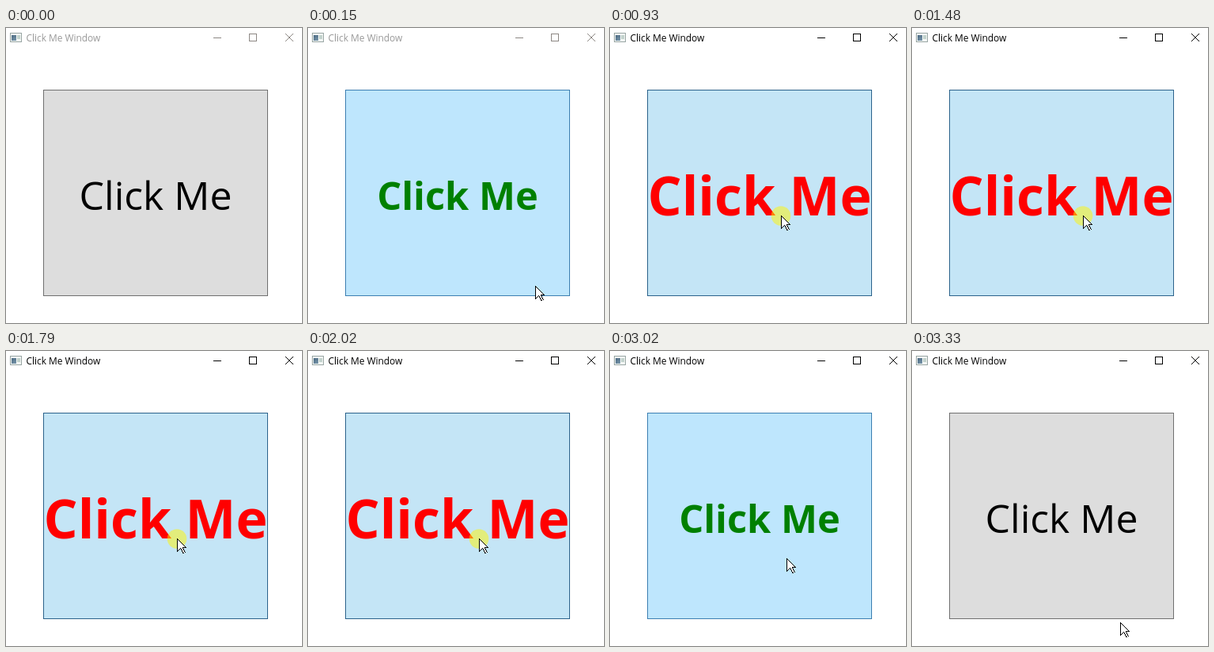
An HTML page with a canvas that plays this animation: 374x373 px, repeating every 3.4 s.

```html
<!DOCTYPE html>
<html lang="en">
<head>
<meta charset="utf-8">
<title>Click Me Window</title>
<style>
  html, body { margin: 0; width: 100%; height: 100%; overflow: hidden; background: #fff; }
  canvas { display: block; }
</style>
</head>
<body>
<canvas id="stage" width="374" height="373"></canvas>
<script>
const ctx = document.getElementById('stage').getContext('2d');
const LOOP = 3400;
const ACTIVATED_AT = 930;
const FONT = '"Open Sans", "Noto Sans", sans-serif';
const BUTTON = { x: 47, y: 78, w: 284, h: 261 };

// Pointer samples: time, x, y. The pointer jumps from one to the next.
const POINTER = [
  [70, 306, 355], [150, 287, 326], [230, 270, 303], [310, 256, 284],
  [380, 245, 268], [460, 235, 254], [540, 227, 242], [610, 216, 237],
  [3020, 223, 262], [3100, 232, 281], [3170, 241, 301], [3250, 251, 322],
  [3330, 263, 343]
];
const PRESSES = [[930, 1160], [1480, 1560], [1790, 1870], [2020, 2090], [2170, 2250]];

const LOOKS = {
  normal:  { fill: '#dddddd', border: '#707070', ink: '#000000', weight: 400, size: 50, baseline: 230 },
  hover:   { fill: '#bee6fd', border: '#3c7fb1', ink: '#008000', weight: 700, size: 48.8, baseline: 230 },
  pressed: { fill: '#c4e5f6', border: '#2c628b', ink: '#ff0000', weight: 700, size: 67.8, baseline: 237 }
};

function box(x, y, w, h, color) {
  ctx.fillStyle = color;
  ctx.fillRect(x, y, w, h);
}

function outline(x, y, w, h, color) {
  ctx.strokeStyle = color;
  ctx.lineWidth = 1;
  ctx.strokeRect(x + 0.5, y + 0.5, w - 1, h - 1);
}

function text(str, x, y, weight, size, color, align) {
  ctx.font = `${weight} ${size}px ${FONT}`;
  ctx.textAlign = align;
  ctx.fillStyle = color;
  ctx.fillText(str, x, y);
}

function drawWindowIcon() {
  box(5, 6, 15, 12, '#f4f7f5');
  outline(5, 6, 15, 12, '#98a5a3');
  const shade = ctx.createLinearGradient(7, 8, 12, 16);
  shade.addColorStop(0, '#4a6880');
  shade.addColorStop(1, '#7593a8');
  box(7, 9, 6, 7, shade);
  box(14, 9, 4, 5, '#c3d3cd');
}

function drawTitleBar(active) {
  drawWindowIcon();
  text('Click Me Window', 25.5, 17, 400, 11.9, active ? '#000' : '#999', 'left');
  const color = active ? '#000' : '#8c8783';
  box(262, 12, 10, 1, color);
  outline(307, 7, 10, 10, color);
  ctx.beginPath();
  ctx.moveTo(353, 7);
  ctx.lineTo(363, 17);
  ctx.moveTo(363, 7);
  ctx.lineTo(353, 17);
  ctx.stroke();
}

function drawButton(look) {
  const { x, y, w, h } = BUTTON;
  box(x, y, w, h, look.fill);
  outline(x, y, w, h, look.border);
  text('Click Me', x + w / 2, look.baseline, look.weight, look.size, look.ink, 'center');
}

// One pixel row of the pointer: black ends, white between.
function pointerRow(left, right, y) {
  box(left, y, right - left + 1, 1, '#000');
  if (right - left > 1) box(left + 1, y, right - left - 1, 1, '#fff');
}

function drawPointer(x, y) {
  for (let row = 0; row <= 16; row++) {
    pointerRow(x, x + (row <= 11 ? row : 16 - row), y + row);
  }
  box(x + 7, y + 11, 5, 1, '#000');
  for (let row = 12; row <= 17; row++) {
    const left = x + 4 + Math.floor((row - 11) / 2);
    pointerRow(left, left + 3, y + row);
  }
  box(x + 7, y + 18, 2, 1, '#000');
}

function drawClickSpot(x, y) {
  ctx.fillStyle = 'rgba(255, 246, 0, 0.5)';
  ctx.beginPath();
  ctx.arc(x, y + 0.5, 12.3, 0, Math.PI * 2);
  ctx.fill();
}

function isOverButton(x, y) {
  const b = BUTTON;
  return x >= b.x && x < b.x + b.w && y >= b.y && y < b.y + b.h;
}

function render(time) {
  const sample = POINTER.filter(([start]) => time >= start).pop();
  const pressed = PRESSES.some(([down, up]) => time >= down && time < up);
  const hover = sample && isOverButton(sample[1], sample[2]);

  box(0, 0, 374, 373, '#fff');
  drawTitleBar(time >= ACTIVATED_AT);
  drawButton(LOOKS[pressed ? 'pressed' : hover ? 'hover' : 'normal']);
  if (sample) {
    const [, x, y] = sample;
    if (pressed) drawClickSpot(x, y);
    drawPointer(x, y);
  }
}

const startTime = performance.now();
function tick() {
  render((performance.now() - startTime) % LOOP);
  requestAnimationFrame(tick);
}
tick();
</script>
</body>
</html>
```
